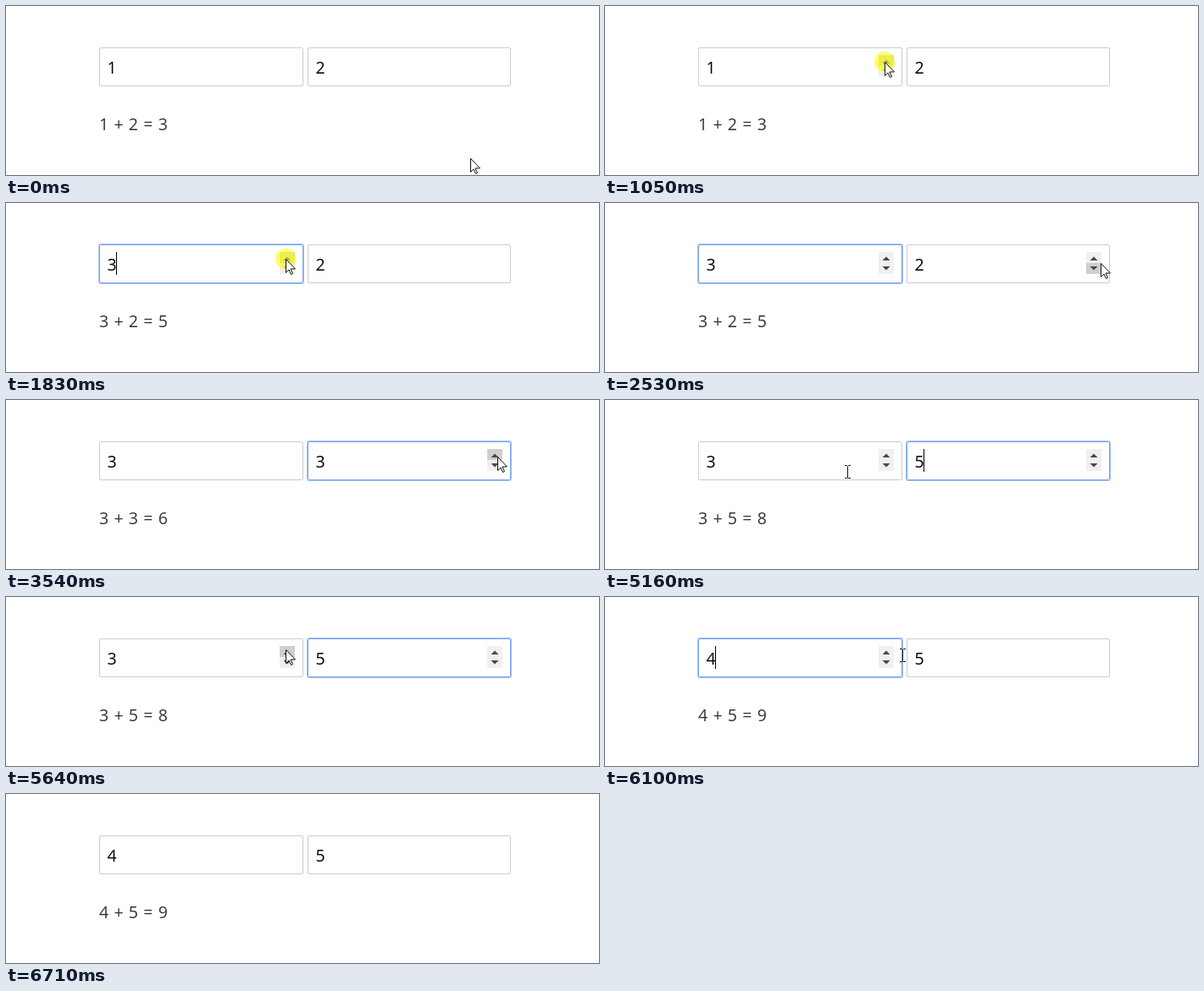
An HTML page that plays this animation: 700 px wide and 200 px high, repeating every 6880 ms.

```html
<!DOCTYPE html>
<html lang="en">
<head>
<meta charset="utf-8">
<title>Adding two numbers</title>
<style>
html, body { margin: 0; width: 100%; height: 100%; overflow: hidden; background: #fff; }
svg { display: block; }
text { font: 19.5px "Open Sans", "Noto Sans", sans-serif; white-space: pre; }
.sum { fill: #333; letter-spacing: .6px; }
</style>
</head>
<body>
<svg id="stage" width="700" height="200" viewBox="0 0 700 200"></svg>
<script>
const LOOP = 6880, STEP = 76, LAG = 30, FLASH = 120, BLINK = 540, BLUR = 6710;
const stage = document.getElementById('stage');
const fields = [{ x: 110, w: 241 }, { x: 356, w: 240 }];
const presses = [[1050, 0], [1800, 0], [2960, 1], [3830, 1], [4830, 1], [5760, 0]]; // time, field
const home = { x: 548, y: 180 };
const moves = [ // from, until, x, y
  [0, 380, 329, 46], [456, 760, 330, 66],
  [2080, 2356, 585, 71], [2660, 2812, 580, 67],
  [4880, 5092, 286, 85], [5092, 5600, 330, 62],
  [6000, 6080, 351, 69], [6080, 6460, 640, 215]
];

function pointer(t) {
  const now = t - t % STEP; // the pointer hops rather than glides
  return moves.reduce((p, [from, until, x, y]) => {
    const k = Math.min(1, Math.max(0, (now - from) / (until - from)));
    const e = k * k * (3 - 2 * k);
    return { x: Math.round(p.x + (x - p.x) * e), y: Math.round(p.y + (y - p.y) * e) };
  }, home);
}

const rect = (x, y, w, h, style) => `<rect x="${x}" y="${y}" width="${w}" height="${h}" ${style}/>`;
const isInside = (p, f) => p.x >= f.x && p.x <= f.x + f.w && p.y >= 49 && p.y < 95;
const spinLeft = f => f.x + f.w - 28;

// 0 is the upper button, 1 the lower one, -1 neither
function hovered(p, f) {
  const dx = p.x - spinLeft(f);
  return dx >= 0 && dx < 18 && p.y >= 58 && p.y < 84 ? +(p.y >= 71) : -1;
}

function spinner(f, hover) {
  const x = spinLeft(f), c = x + 9;
  const half = i => rect(x, 58 + 13 * i, 18, 13, `fill="${hover === i ? '#cfcfcf' : '#f0f0f0'}"`);
  return half(0) + half(1) +
    `<path d="M${c - 4.5} 68h9l-4.5-4.5zM${c - 4.5} 75h9l-4.5 4.5z" fill="#484848"/>`;
}

function field(f, value, focused, caret, p) {
  const { x, w } = f;
  const ring = focused
    ? rect(x - .5, 48.5, w + 1, 47, 'rx="2" fill="none" stroke="#a0c0f4"')
    : '';
  return ring +
    rect(x + .5, 49.5, w - 1, 45, `rx="1.5" fill="#fff" stroke="${focused ? '#76a4ec' : '#ccc'}"`) +
    `<text x="${x + 9.5}" y="80">${value}</text>` +
    (focused || isInside(p, f) ? spinner(f, hovered(p, f)) : '') +
    (focused && caret ? rect(x + 20, 58, 1, 27, '') : '');
}

const shapes = {
  arrow: '<path d="M.5 .5v16l3.5-3.5 2.5 5.5 2-1-2.5-5.5h5.5z" fill="#fff" stroke="#111"/>',
  beam: '<path d="M-3-7.5h2.5l1 1 1-1h2.5M.5-6.5v14M-3 7.5h2.5l1-1 1 1h2.5" fill="none" stroke="#111"/>'
};

function scene(t) {
  const p = pointer(t);
  const done = presses.filter(([at]) => t >= at + LAG);
  const values = fields.map((_, i) => i + 1 + done.filter(d => d[1] === i).length);
  const [last, focus] = t < BLUR && done.length ? done.at(-1) : [0, -1];
  const caret = (t - last - LAG) % (2 * BLINK) < BLINK;
  const flash = presses.some(([at]) => t >= at && t < at + FLASH);
  const overText = fields.some(f => isInside(p, f) && hovered(p, f) < 0);
  const [a, b] = values;
  return fields.map((f, i) => field(f, values[i], focus === i, caret, p)).join('') +
    `<text class="sum" x="110" y="147">${a} + ${b} = ${a + b}</text>` +
    (flash ? `<circle cx="${p.x}" cy="${p.y}" r="12" fill="#ff0" fill-opacity=".6"/>` : '') +
    `<g transform="translate(${p.x} ${p.y})">${shapes[overText ? 'beam' : 'arrow']}</g>`;
}

const start = performance.now();
let shown = '';
function draw() {
  const next = scene((performance.now() - start) % LOOP);
  if (next !== shown) stage.innerHTML = shown = next;
  requestAnimationFrame(draw);
}
draw();
</script>
</body>
</html>
```
